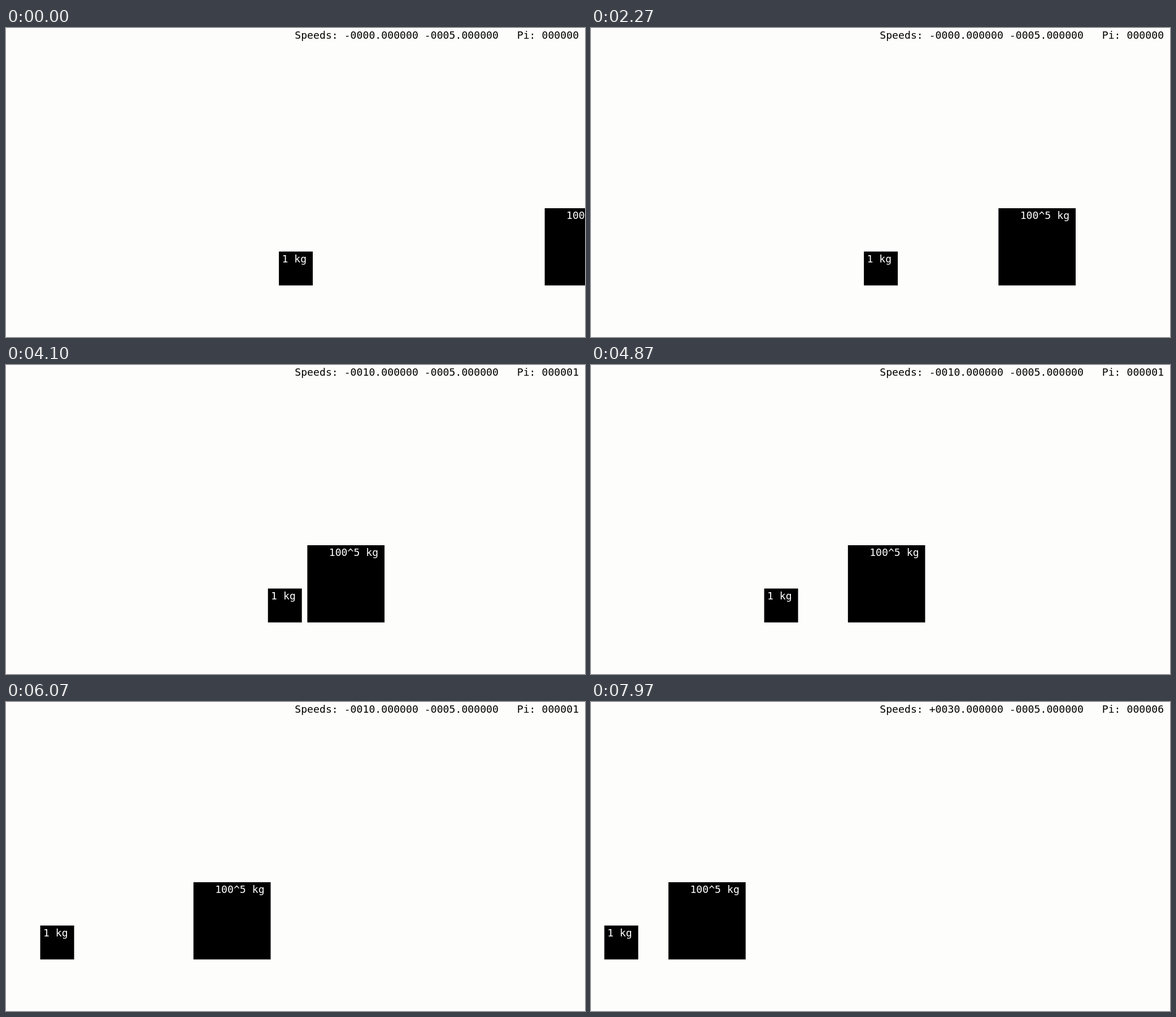
An HTML page with a canvas for the animation above (8 s loop, 1025 px wide and 547 px high).

```html
<!DOCTYPE html>
<html lang="en">
<head>
<meta charset="utf-8">
<title>Colliding blocks</title>
<style>
html, body { margin: 0; width: 100%; height: 100%; overflow: hidden; background: #fdfdfb; }
canvas { display: block; }
</style>
</head>
<body>
<canvas id="stage" width="1025" height="547"></canvas>
<script>
const ctx = document.getElementById("stage").getContext("2d");
const LOOP = 8000;
const UNIT = 1025 / 1500;          // pixels per world unit
const FLOOR = 455.7, WALL = 0.5, PAD = 10.93;
const SMALL = 60, BIG = 200 * UNIT;
const SMALL_X = 483.1, BIG_X = 953.67;
const SPEED = 5;                   // world units per step

// The big block barely slows, so hit n happens when the free gap is travel / n.
function pose(step) {
  const travel = SMALL_X - WALL;
  const bigX = BIG_X - SPEED * UNIT * step;
  const gap = bigX - SMALL - WALL;
  const hits = Math.floor(travel / gap);
  if (!hits) return { bigX, smallX: SMALL_X, speed: 0, hits };

  const odd = hits % 2;            // odd: hit by the block, even: by the wall
  const speed = 2 * SPEED * Math.ceil(hits / 2) * (odd ? -1 : 1);
  const elapsed = (travel / hits - gap) / (SPEED * UNIT);
  const start = WALL + (odd ? travel / hits : 0);
  return { bigX, smallX: start + speed * UNIT * elapsed, speed, hits };
}

function signed(v) {
  return (v > 0 ? "+" : "-") + Math.abs(v).toFixed(6).padStart(11, "0");
}

function label(text, right, top, color) {
  ctx.fillStyle = color;
  ctx.fillText(text, right - PAD, top + 19);
}

function block(x, size, text) {
  const top = FLOOR - size;
  ctx.fillStyle = "#000";
  ctx.fillRect(x, top, size, size);
  label(text, x + size, top, "#fff");
}

function draw(now) {
  const ticks = Math.floor((now % LOOP) / 10);
  const { bigX, smallX, speed, hits } = pose(Math.floor((ticks + 0.5) * 0.3));

  ctx.fillStyle = "#fdfdfb";
  ctx.fillRect(0, 0, 1025, 547);
  ctx.font = '18.16px "DejaVu Sans Mono", monospace';
  ctx.textAlign = "right";
  block(smallX, SMALL, "1 kg");
  block(bigX, BIG, "100^5 kg");
  const count = String(hits).padStart(6, "0");
  label(`Speeds: ${signed(speed)} ${signed(-SPEED)}   Pi: ${count}`, 1025, 0, "#000");
}

let origin;
function tick(now) {
  origin ??= now;
  draw(now - origin);
  requestAnimationFrame(tick);
}
draw(0);
requestAnimationFrame(tick);
</script>
</body>
</html>
```
